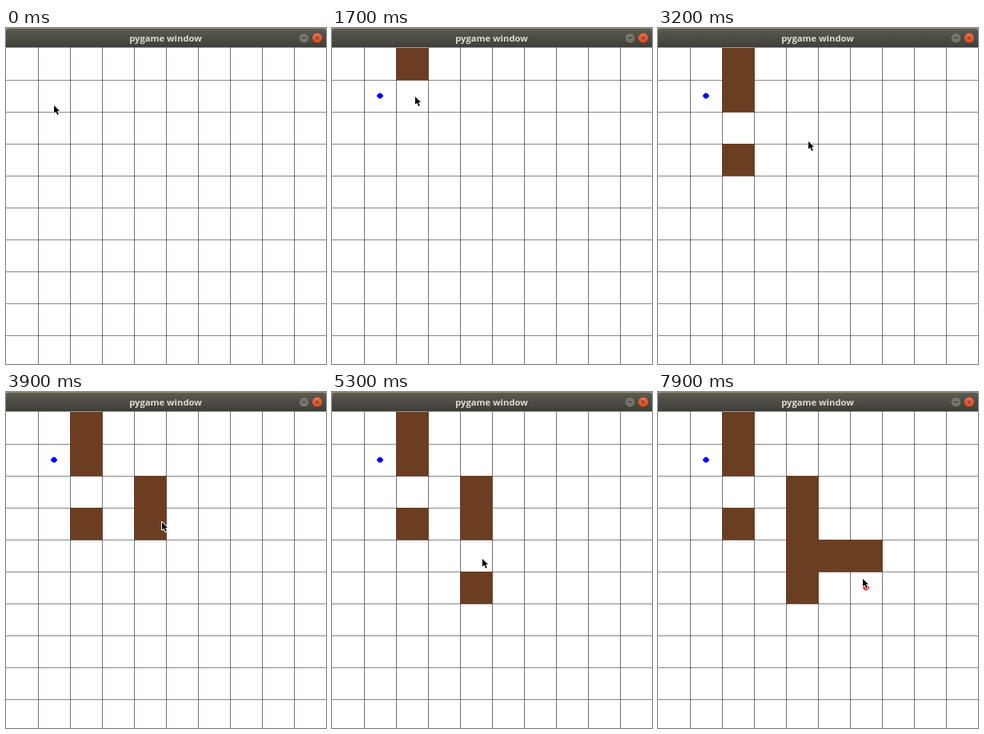
These frames come from a looping animation (400 px wide and 421 px high, 8000 ms). An HTML page:

```html
<!DOCTYPE html>
<html lang="en">
<head>
<meta charset="utf-8">
<title>pygame window</title>
<style>
html, body { margin: 0; width: 100%; height: 100%; overflow: hidden; background: #fff; }
svg { display: block; width: 400px; height: 421px; }
.title { font: bold 11.2px "Open Sans", "Noto Sans", sans-serif; fill: #dfdbd2; text-anchor: middle; }
.grid { stroke: #000; }
.wall { fill: #6b3e22; }
.start { fill: #00f; }
.end { fill: #f00; }
#cursor { fill: #000; stroke: #fff; stroke-width: 2; stroke-linejoin: round; paint-order: stroke; }
</style>
</head>
<body>
<svg viewBox="0 0 400 421">
  <defs>
    <linearGradient id="bar" x2="0" y2="1">
      <stop stop-color="#5c5b51"/>
      <stop offset="1" stop-color="#3e3d38"/>
    </linearGradient>
    <linearGradient id="close" x2="0" y2="1">
      <stop stop-color="#f1714c"/>
      <stop offset="1" stop-color="#df4a1c"/>
    </linearGradient>
  </defs>
  <rect width="400" height="421" fill="#fff"/>
  <g id="board"></g>
  <rect width="400" height="24" fill="#a39b88"/>
  <path d="M0 24.5V4Q0 .8 4 .8H396Q400 .8 400 4V24.5Z" fill="url(#bar)"/>
  <text class="title" x="199.5" y="16.6">pygame window</text>
  <g stroke="#3c3b37" stroke-width=".6">
    <circle cx="372.5" cy="12.5" r="6.4" fill="#75736b"/>
    <circle cx="389" cy="12.5" r="6.4" fill="url(#close)"/>
    <path d="M370 12.5h5M387 10.5l4 4m0-4l-4 4" stroke-width="1"/>
  </g>
  <path id="cursor" d="M0 0V9.8L2.3 7.8 4.2 12 5.8 11.3 4 7.3 7 7.1Z"/>
</svg>
<script>
const LOOP = 8000, STEP = 100, CELL = 40, TOP = 25;
const board = document.getElementById('board');
const cursor = document.getElementById('cursor');

// Pointer strokes: start time, number of steps, end point
const home = [60, 97];
const strokes = [
  [800, 6, 114, 50],
  [1400, 4, 104, 86],
  [1800, 4, 96, 147],
  [2300, 3, 101, 155],
  [2700, 7, 193, 141],
  [3500, 2, 195, 163],
  [4000, 4, 192, 241],
  [4500, 4, 189, 260],
  [5100, 3, 188, 209],
  [5500, 4, 232, 207],
  [6100, 2, 254, 213],
  [6800, 2, 256, 247],
  [7200, 3, 256, 234]
];

// Each click marks the cell under the pointer: start first, end last, walls between
const clicks = [300, 1400, 1800, 2100, 3300, 3900, 4300, 5400, 5800, 6300, 7900];

function add(tag, attrs) {
  const el = document.createElementNS('http://www.w3.org/2000/svg', tag);
  for (const k in attrs) el.setAttribute(k, attrs[k]);
  return board.appendChild(el);
}

const ease = p => p * p * (3 - 2 * p);

function cursorAt(t) {
  let [x, y] = home;
  for (const [start, steps, ex, ey] of strokes) {
    if (t < start) break;
    const p = ease(Math.min(1, ((t - start) / STEP + 1) / steps));
    x += (ex - x) * p;
    y += (ey - y) * p;
  }
  return [Math.round(x), Math.round(y)];
}

function mark(at, i) {
  const [px, py] = cursorAt(at);
  const x = Math.floor(px / CELL) * CELL;
  const y = Math.floor((py - TOP) / CELL) * CELL + TOP;
  const isDot = i === 0 || i === clicks.length - 1;
  const el = isDot
    ? add('path', {
        class: i ? 'end' : 'start',
        d: 'M-4-.5L-1.2-3.5H1.2L4-.5V.5L1.2 3.5H-1.2L-4 .5Z',
        transform: `translate(${x + CELL / 2} ${y + CELL / 2})`
      })
    : add('rect', { class: 'wall', x, y, width: CELL + .75, height: CELL + .5 });
  return { at, el };
}

for (let i = 1; i < 10; i++) {
  const p = i * CELL + .5;
  add('path', { class: 'grid', 'stroke-opacity': .55, d: `M${p} 24V421` });
  add('path', { class: 'grid', 'stroke-opacity': .47, d: `M0 ${TOP + p}H400` });
}
const marks = clicks.map(mark);

function draw() {
  const t = Math.floor(performance.now() % LOOP / STEP) * STEP;
  for (const { at, el } of marks) el.setAttribute('visibility', t >= at ? 'visible' : 'hidden');
  cursor.setAttribute('transform', `translate(${cursorAt(t).join(' ')})`);
  requestAnimationFrame(draw);
}
draw();
</script>
</body>
</html>
```
